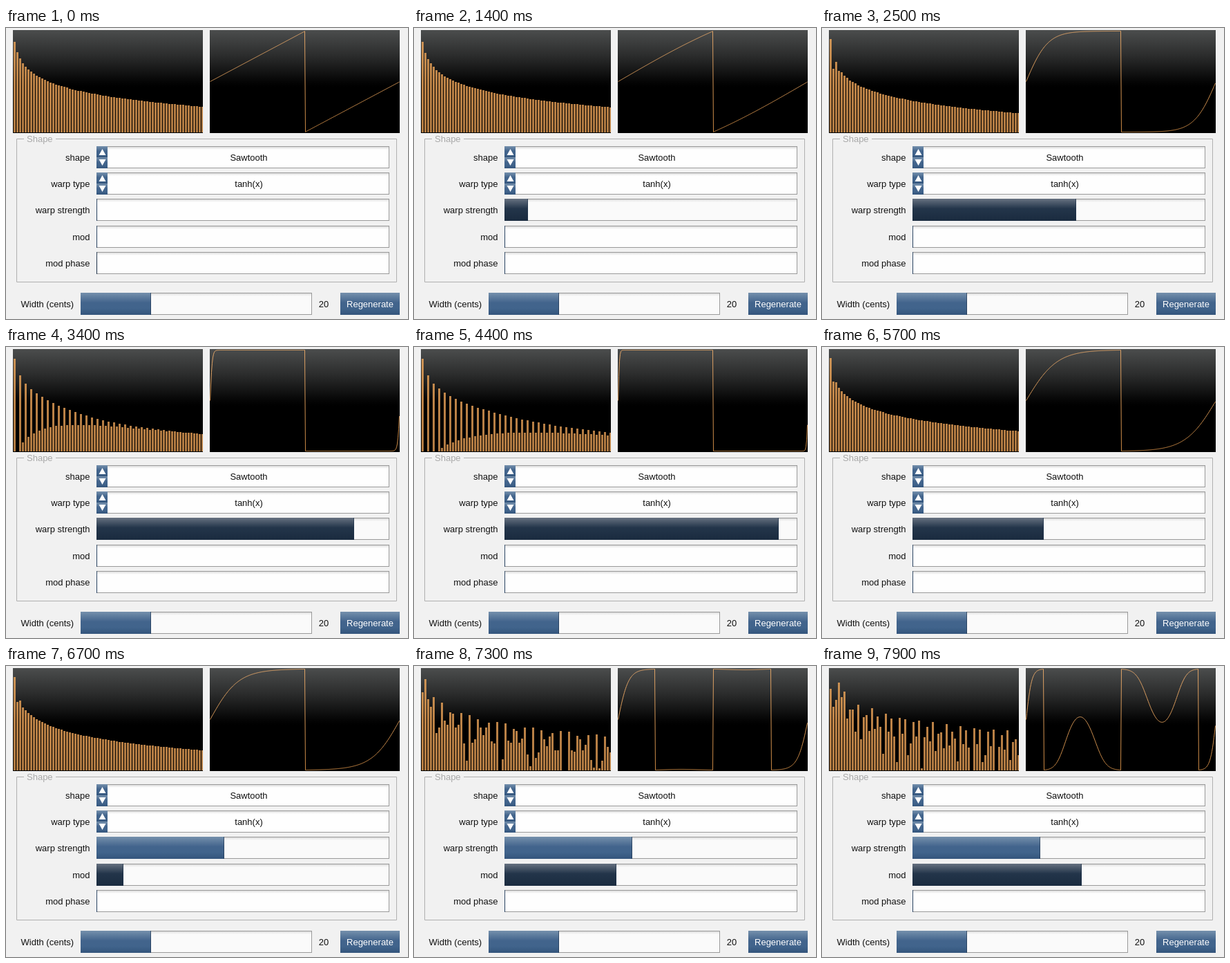
Recreate the animation shown at these times as an HTML page. Size 582 by 421 pixels, loop 8 s.

```html
<!DOCTYPE html>
<html lang="en">
<head>
<meta charset="utf-8">
<title>Oscillator shape</title>
<style>
html, body { margin: 0; width: 100%; height: 100%; overflow: hidden; background: #f1f1f1; }
svg { display: block; width: 582px; height: 421px; font: 13px "Liberation Sans", Arial, sans-serif; }
text { fill: #111; }
.end { text-anchor: end; }
.mid { text-anchor: middle; }
</style>
</head>
<body>
<svg id="stage" viewBox="0 0 582 421" xmlns="http://www.w3.org/2000/svg">
  <defs>
    <linearGradient id="panel" x1="0" y1="0" x2="0" y2="1">
      <stop offset="0" stop-color="#4b4d4d"/><stop offset=".25" stop-color="#2b2c2c"/>
      <stop offset=".5" stop-color="#050505"/><stop offset=".55" stop-color="#000"/>
    </linearGradient>
    <linearGradient id="amber" gradientUnits="userSpaceOnUse" x1="0" y1="3" x2="0" y2="152">
      <stop offset="0" stop-color="#cf9658"/><stop offset=".5" stop-color="#bd8347"/>
      <stop offset="1" stop-color="#b07a42"/>
    </linearGradient>
    <linearGradient id="trace" gradientUnits="userSpaceOnUse" x1="0" y1="3" x2="0" y2="152">
      <stop offset="0" stop-color="#e0a468"/><stop offset="1" stop-color="#c98742"/>
    </linearGradient>
    <linearGradient id="blue" x1="0" y1="0" x2="0" y2="1">
      <stop offset="0" stop-color="#7590ac"/><stop offset=".45" stop-color="#42648c"/>
      <stop offset=".7" stop-color="#41648c"/><stop offset="1" stop-color="#34557c"/>
    </linearGradient>
    <linearGradient id="dark" x1="0" y1="0" x2="0" y2="1">
      <stop offset="0" stop-color="#667180"/><stop offset=".45" stop-color="#23354a"/>
      <stop offset="1" stop-color="#1a2b3f"/>
    </linearGradient>
    <linearGradient id="inset" x1="0" y1="0" x2="0" y2="1">
      <stop offset="0" stop-color="#d8d8d8"/><stop offset=".14" stop-color="#fefefe"/>
      <stop offset="1" stop-color="#fefefe"/>
    </linearGradient>
    <linearGradient id="insetOn" x1="0" y1="0" x2="0" y2="1">
      <stop offset="0" stop-color="#d8d8d8"/><stop offset=".14" stop-color="#fafafa"/>
      <stop offset="1" stop-color="#fafafa"/>
    </linearGradient>
  </defs>
  <rect width="582" height="421" fill="#f1f1f1"/>
  <rect x="10" y="3" width="275" height="149" fill="url(#panel)"/>
  <rect x="295" y="3" width="275" height="149" fill="url(#panel)"/>
  <path id="bars" fill="url(#amber)" shape-rendering="crispEdges"/>
  <path id="wave" fill="none" stroke="url(#trace)" stroke-linejoin="round"/>
  <path d="M26 160.5H15.5V367.5H565.5V160.5H72" fill="none" stroke="#b0b0b0"/>
  <text x="30" y="165" style="fill:#a9a9a9">Shape</text>
  <g id="form"></g>
</svg>
<script>
const LOOP = 8000, STEP = 100, TAU = 2 * Math.PI;
const $ = id => document.getElementById(id);
const form = $("form");

function add(tag, attrs, label) {
  const el = document.createElementNS("http://www.w3.org/2000/svg", tag);
  for (const key in attrs) el.setAttribute(key, attrs[key]);
  if (label) el.textContent = label;
  form.append(el);
  return el;
}

function box(x, y, width) {
  return add("rect", { x: x + .5, y: y + .5, width: width - 1, height: 31, fill: "url(#inset)", stroke: "#9a9a9a" });
}

function slider(x, y, width) {
  const track = box(x, y, width);
  const fill = add("rect", { x, y, height: 32 });
  const edge = add("rect", { y, width: 1, height: 32, fill: "#1c3048", opacity: .6 });
  return (value, active) => {
    const w = Math.max(1, Math.round(value * width));
    track.setAttribute("fill", value > 0 ? "url(#insetOn)" : "url(#inset)");
    fill.setAttribute("width", w);
    fill.setAttribute("fill", active ? "url(#dark)" : "url(#blue)");
    edge.setAttribute("x", x + w - 1);
  };
}

function select(y, value) {
  box(131, y, 424);
  for (const top of [y, y + 16])
    add("rect", { x: 131, y: top, width: 16, height: 16, fill: "url(#blue)" });
  add("path", { d: `M139.5 ${y + 4}l5 9h-10zM134.5 ${y + 19}h10l-5 9z`, fill: "#fff" });
  add("text", { x: 351.5, y: y + 21, class: "mid" }, value);
}

const rows = [["shape", 171], ["warp type", 209], ["warp strength", 247], ["mod", 286], ["mod phase", 324]];
for (const [label, y] of rows) add("text", { x: 121.5, y: y + 21, class: "end" }, label);
select(171, "Sawtooth");
select(209, "tanh(x)");
const setStrength = slider(131, 247, 424);
const setMod = slider(131, 286, 424);
const setPhase = slider(131, 324, 424);
add("text", { x: 59.8, y: 404, class: "mid" }, "Width (cents)");
slider(108, 383, 335)(102 / 335, false);
add("text", { x: 460, y: 404, class: "mid" }, "20");
add("rect", { x: 484, y: 383, width: 86, height: 32, fill: "url(#blue)" });
add("text", { x: 527, y: 404, class: "mid", style: "fill:#fff" }, "Regenerate");

// Slider drags as [time, value]
const strengthKeys = [[900, 0], [1000, .01], [1100, .01], [1400, .08], [2000, .32], [2500, .559], [3000, .76],
  [3400, .88], [3800, .95], [4300, .95], [4400, .936], [4700, .86], [5200, .63], [5700, .448], [5900, .436]];
const modKeys = [[6500, 0], [6600, .04], [7000, .25], [7300, .382], [7900, .578]];

function valueAt(keys, t) {
  if (t <= keys[0][0]) return keys[0][1];
  for (let i = 1; i < keys.length; i++) {
    const [t0, v0] = keys[i - 1], [t1, v1] = keys[i];
    if (t <= t1) return v0 + (v1 - v0) * (t - t0) / (t1 - t0);
  }
  return keys[keys.length - 1][1];
}

// Phase-modulated sawtooth pushed through tanh
function oscillator(strength, mod) {
  const drive = Math.max(.001, 6.7 * strength + 120 * strength ** 9);
  const depth = 2.22 * mod * mod;
  const norm = Math.tanh(drive);
  return x => {
    const p = x + depth * Math.sin(TAU * x) + .5;
    return Math.tanh(drive * (2 * (p - Math.floor(p)) - 1)) / norm;
  };
}

function drawWave(osc) {
  let d = "";
  for (let i = 0; i < 275; i++)
    d += `${i ? "L" : "M"}${295.5 + i} ${(77.5 - 73 * osc(i / 275)).toFixed(2)}`;
  $("wave").setAttribute("d", d);
}

const SAMPLES = 1024, HARMONICS = 200, SHOWN = 69;
const sine = Array.from({ length: 2 * SAMPLES }, (_, i) => Math.sin(Math.PI * i / SAMPLES));

function drawBars(osc) {
  // The wave is odd, so half a period and sine terms are enough
  const half = Array.from({ length: SAMPLES / 2 }, (_, i) => osc((i + .5) / SAMPLES));
  const amps = [];
  let power = 0;
  for (let n = 1; n <= HARMONICS; n++) {
    let sum = 0;
    for (let i = 0; i < half.length; i++) sum += half[i] * sine[n * (2 * i + 1) % (2 * SAMPLES)];
    amps.push(Math.abs(sum));
    power += sum * sum;
  }
  const rms = Math.sqrt(power);
  let d = "";
  for (let n = 0; n < SHOWN; n++) {
    const h = Math.round(136.5 + 22.2 * Math.log(amps[n] / rms + 1e-9));
    const x = 11 + 4 * n;
    if (h > 0) d += `M${x} 151v${-h}h${Math.min(3, 285 - x)}v${h}z`;
  }
  $("bars").setAttribute("d", d);
}

let shown = -1, shape = "";
function draw(now) {
  const t = Math.floor(now % LOOP / STEP) * STEP;
  if (t !== shown) {
    shown = t;
    const strength = valueAt(strengthKeys, t), mod = valueAt(modKeys, t);
    setStrength(strength, t >= 800 && t < 6600);
    setMod(mod, t === 400 || t >= 6600);
    setPhase(0, t < 400);
    const key = strength + "/" + mod;
    if (key !== shape) {
      shape = key;
      const osc = oscillator(strength, mod);
      drawWave(osc);
      drawBars(osc);
    }
  }
}

const start = performance.now();
function tick() {
  draw(performance.now() - start);
  requestAnimationFrame(tick);
}
tick();
</script>
</body>
</html>
```
